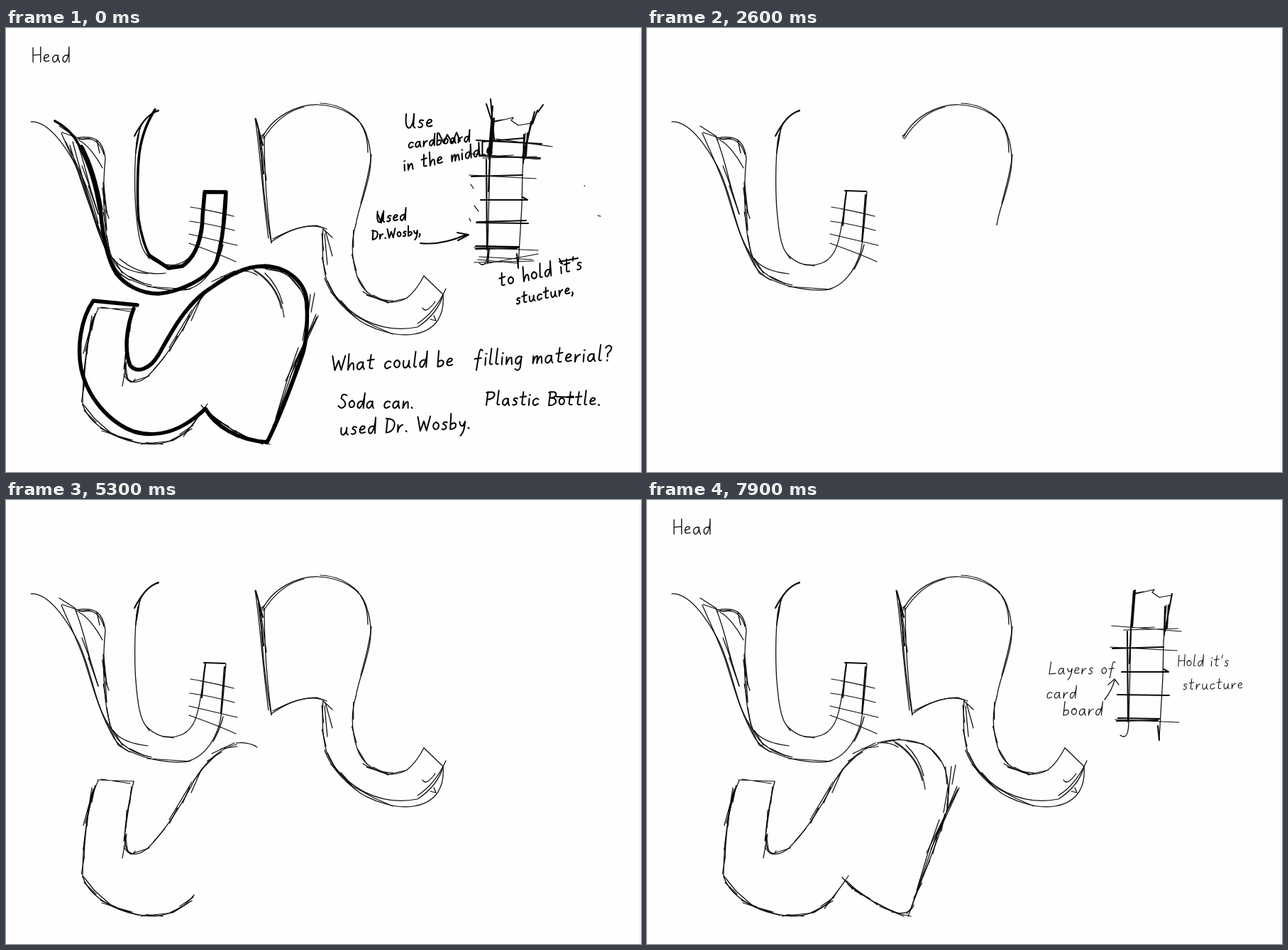
These frames come from a looping animation (895 by 625 pixels, 8 s). An HTML page:

```html
<!DOCTYPE html>
<html lang="en">
<head>
<meta charset="utf-8">
<title>Sketch replay</title>
<style>
  html, body { margin: 0; width: 100%; height: 100%; overflow: hidden; background: #fefefe; }
  svg { display: block; width: 100vw; height: 100vh; }
  path { fill: none; stroke: #0a0a0a; stroke-width: 1.25; stroke-linecap: round; stroke-linejoin: round; }
  .firm path { stroke: #000; stroke-width: 2; vector-effect: non-scaling-stroke; }
  .ink path { stroke: #000; stroke-width: 5.5; }
  path.mid { stroke-width: 2.1; }
  .ink path.mid { stroke-width: 3.6; }
  .ink path.fat { stroke-width: 7; }
</style>
</head>
<body>
<svg viewBox="0 0 895 625">
  <!-- handwriting: baseline at 0, x-height 10 -->
  <defs id="letters">
    <path data-c="a" d="M8-8Q4-11 1-6Q0 0 4 0Q8-2 8-9Q8-2 10 0"/>
    <path data-c="b" d="M1-20L1 0Q8 0 8-5Q7-10 1-6"/>
    <path data-c="c" d="M8-8Q4-11 1-6Q0 0 4 0L8-2"/>
    <path data-c="d" d="M8-8Q4-11 1-6Q0 0 4 0Q9-5 9-20L9 0"/>
    <path data-c="e" d="M1-5Q8-6 7-9Q3-12 1-6Q0 1 8-2"/>
    <path data-c="f" d="M9-18Q6-22 5-15L3 6M0-8L8-9"/>
    <path data-c="g" d="M8-8Q4-11 1-6Q0 0 4 0Q8-3 8-9L7 5Q5 10 1 6"/>
    <path data-c="h" d="M1-20L1 0Q4-10 7-8Q8-6 8 0"/>
    <path data-c="i" d="M1-9L1 0M1-14L2-14"/>
    <path data-c="l" d="M2-20L1-2Q2 0 4-1"/>
    <path data-c="m" d="M1-9L1 0Q3-10 6-9L6 0Q8-10 11-8L12 0"/>
    <path data-c="n" d="M1-9L1 0Q4-10 7-8L8 0"/>
    <path data-c="o" d="M5-10Q0-9 1-4Q3 1 7-2Q10-8 4-10"/>
    <path data-c="r" d="M1-9L1 0Q2-8 7-9"/>
    <path data-c="s" d="M7-9Q2-11 2-7Q7-5 6-2Q4 1 1-1"/>
    <path data-c="t" d="M4-18L3-2Q4 0 7-1M0-11L8-12"/>
    <path data-c="u" d="M1-9Q0 0 4 0Q8-2 8-9L8-2L10 0"/>
    <path data-c="y" d="M1-9Q2-2 6-4L8-9Q8 4 3 9"/>
    <path data-c="B" d="M2-18L1 0M0-17Q10-20 10-14Q9-10 2-10Q12-10 10-3Q6 1 1 0"/>
    <path data-c="D" d="M2-18L1 0M0-18Q13-17 11-8Q9 0 1 0"/>
    <path data-c="H" d="M1-19L1 0M11-20L11 0M1-9L11-10"/>
    <path data-c="L" d="M2-19L1 0L11-1"/>
    <path data-c="P" d="M2-18L1 0M0-17Q12-20 11-13Q9-8 2-8"/>
    <path data-c="S" d="M10-17Q3-21 3-13Q11-8 9-3Q5 3 0-3"/>
    <path data-c="U" d="M1-18Q0 0 6 0Q11-3 11-18L11-2L13 0"/>
    <path data-c="W" d="M0-18L4 0L8-12L12 0L16-18"/>
    <path data-c="." d="M1-1L2 0"/>
    <path data-c="," d="M1-2L2 0L0 4"/>
    <path data-c="'" d="M2-19L1-14"/>
    <path data-c="?" d="M1-16Q4-21 8-17Q9-13 4-9L4-5M4-1L4 0"/>
  </defs>

  <path d="M893.5 0V625" style="stroke:#f1f1f1"/>

  <g id="drawing">
    <!-- trunk, raised -->
    <g data-draw="1550 2450">
      <path d="M215 117C196 121 188 138 184 160C181 190 181 230 183 255C185 280 188 310 199 320C215 335 230 337 246 331C262 325 268 310 272 290Q277 265 281 230"/>
      <path class="mid" d="M215 116C200 121 190 135 181 152"/>
      <path d="M189 140L184 170M186 150L183 176M198 319L202 325M228 333L236 335"/>
      <path d="M98 155C125 150 137 158 140 184C137 215 136 245 145 268"/>
      <path d="M79 147L108 157Q130 152 138 178M99 157L118 155"/>
      <path d="M103 158C115 164 128 182 136 197M128 158L132 176"/>
      <path data-rough d="M137 217C138 270 140 300 150 325C160 345 180 357 205 362"/>
      <path d="M138 222L142 260M140 255L142 285"/>
      <path d="M175 354C200 366 230 370 250 369C275 366 293 343 301 315C306 295 307 260 310 231"/>
      <path d="M199 364L230 366L259 368M292 340Q302 322 306 305"/>
      <path class="mid" d="M279 229L309 230"/>
      <path class="mid" d="M276 278L279 245L281 231M303 300L308 235"/>
      <path d="M260 252Q290 257 321 265"/>
      <path d="M259 272Q290 276 322 285"/>
      <path d="M258 290L326 306"/>
      <path d="M258 303Q300 318 324 329"/>
      <path d="M75 138L97 152C108 180 112 200 119 226L130 262"/>
      <path d="M78 148C92 180 104 205 112 230C122 262 132 300 152 335Q160 347 173 354"/>
      <path d="M107 194L119 226M116 222L130 262M142 312L158 345L175 355"/>
      <path d="M35 132C60 131 84 166 102 200C117 232 122 265 133 293C148 332 165 342 200 346"/>
    </g>

    <!-- head in profile -->
    <g data-draw="2430 2600">
      <path d="M361 155C375 125 410 107 440 108C475 110 500 125 508 150C520 185 512 210 503 240Q496 260 493 277"/>
      <path d="M363 156Q385 120 420 111M360 152L364 149"/>
      <path d="M443 106Q475 107 497 130"/>
      <path d="M500 135Q510 150 510 175"/>
      <path d="M515 178C513 200 507 220 500 247"/>
    </g>
    <g data-draw="2600 3300">
      <path data-rough d="M493 277C486 300 487 325 495 350C502 372 525 386 545 386Q556 385 565 380"/>
      <path d="M503 371Q520 383 545 384M508 376L540 386L562 381"/>
      <path d="M351 127C358 170 360 220 370 296"/>
      <path class="mid" d="M352 128L362 165M356 145L363 205"/>
      <path d="M364 152C364 200 367 250 374 301M358 150L367 214"/>
      <path d="M360 185Q364 250 374 303"/>
      <path d="M374 301C400 283 425 275 446 281"/>
      <path d="M376 297Q410 278 438 278L452 283"/>
      <path data-rough d="M447 281C445 310 446 335 452 355Q465 387 500 408"/>
      <path d="M450 285L460 321M449 290L453 333M447 283L460 295"/>
    </g>
    <g data-draw="3300 3950">
      <path d="M565 380Q578 370 589 349"/>
      <path d="M589 349L615 374"/>
      <path d="M500 408C535 428 565 424 580 421Q609 402 616 375"/>
      <path d="M449 352C457 375 475 395 500 413C520 425 550 435 575 431C610 425 618 400 616 375"/>
      <path d="M620 367Q605 400 580 416M587 394Q592 403 605 385M598 410L606 412L603 405"/>
      <path d="M458 372L487 402L520 420L545 431"/>
    </g>

    <!-- head, lower left -->
    <g data-draw="3950 4100">
      <path d="M125 405C118 430 112 450 110 504"/>
      <path d="M123 407L109 458M121 405L114 450M124 407L112 455"/>
    </g>
    <g data-draw="4100 5300">
      <path data-rough d="M130 395C118 420 108 470 108 530"/>
      <path d="M129 394L180 396M134 393L175 399"/>
      <path data-rough d="M108 530C118 560 160 585 210 586C235 583 250 575 265 556"/>
      <path d="M109 530L125 550L150 572L178 580M135 567L175 580"/>
      <path d="M190 586L235 581L262 564M245 572L264 559"/>
      <path data-rough d="M180 396C172 430 165 465 168 485C172 502 185 502 200 490C225 465 250 425 265 395C280 370 300 350 325 344"/>
      <path d="M177 405L166 480M170 470L164 504M182 494Q176 505 166 488"/>
      <path d="M230 450L262 397M261 412L275 380L295 360"/>
      <path d="M290 357L322 342M303 350L326 347M325 342Q342 340 354 348"/>
    </g>
    <g data-draw="5300 6050">
      <path data-rough d="M325 342C350 335 385 335 405 355C425 375 426 400 424 430C418 460 400 500 368 586"/>
      <path d="M345 338C370 350 388 375 392 407"/>
      <path d="M350 342Q380 360 388 395M365 345Q383 362 390 388"/>
      <path d="M429 375L423 430M435 373L430 400M424 405L418 440"/>
      <path d="M440 405L400 492M437 403L405 480M438 407L394 497"/>
      <path d="M412 450L398 490L380 550M410 465L372 575L366 582"/>
      <path d="M265 556L284 529M250 575L280 535M275 531L290 548"/>
      <path data-rough d="M281 536L302 556M283 541Q320 570 358 583L372 586"/>
      <path d="M290 545L325 570M328 572L362 586M345 580Q370 586 376 570"/>
    </g>

    <g data-draw="6050 6250"><g data-say="Head" transform="translate(37 48) scale(1.07)"/></g>

    <!-- ladder -->
    <g data-draw="6250 6600">
      <path d="M684 151L682 190L681 230L679 310Q679 340 667 331"/>
      <path class="mid" d="M677 185L678 312M682 182L680 230"/>
      <path d="M732 148L728 200L727 250L722 335"/>
      <path class="mid" d="M730 150L729 190M720 318L722 338"/>
      <path class="mid" d="M669 242L735 242M728 238L735 242"/>
      <path class="mid" d="M663 274L736 275"/>
      <path d="M660 309L750 313"/>
      <path class="mid" d="M664 307L723 308M662 311L720 310"/>
    </g>
    <g class="draft" data-draw="6600 6800">
      <g data-say="Layers of" transform="translate(566 245) skewX(-6) scale(.9)"/>
      <g data-say="ca" transform="translate(563 279) skewX(-6) scale(.9)"/>
    </g>
    <g class="draft" data-draw="6850 7350">
      <g data-say="rd" transform="translate(586 279) skewX(-6) scale(.9)"/>
      <g data-say="board" transform="translate(586 303) skewX(-6) scale(.97)"/>
      <path d="M645 281Q655 268 659 254M650 260L659 252L665 260"/>
    </g>
    <g class="draft" data-draw="7350 7700">
      <g data-say="Hold it's" transform="translate(748 234) skewX(-4) scale(.83)"/>
    </g>
    <g data-draw="7700 7900">
      <path class="mid" d="M686 128L682 180M688 127L684 178"/>
      <path class="mid" d="M740 132L730 185M735 148L733 180"/>
      <path d="M685 133L715 126L712 130L722 137L740 134M688 131L700 129"/>
      <path d="M655 177L753 185M672 183L748 181M695 180L715 179"/>
      <path d="M653 207L747 212"/>
      <path class="mid" d="M656 209L728 207"/>
    </g>
    <g class="draft" data-draw="7700 7900">
      <g data-say="structure" transform="translate(755 267) rotate(-1) skewX(-4) scale(.83)"/>
    </g>

    <!-- finished sheet only -->
    <g class="final ink">
      <path class="mid" d="M210 115C197 135 189 160 187 185C185 210 185 250 187 270C190 290 197 312 203 321"/>
      <path d="M203 321L229 338L249 335C270 320 277 290 277 265L280 231L310 231C309 260 305 300 297 328C285 355 240 372 215 374C190 374 168 362 155 345"/>
      <path class="mid" d="M69 131Q95 145 105 170"/>
      <path class="fat" d="M106 168Q124 202 133 255"/>
      <path d="M133 255C137 305 148 340 160 350"/>
      <path d="M185 390L123 384C105 410 100 450 106 480C115 520 145 555 180 568C210 577 245 570 281 536C295 560 325 580 368 583C385 550 400 510 416 465C424 445 425 410 424 385C422 360 400 337 365 335C330 335 305 355 280 372C250 395 232 430 215 460C203 480 185 487 175 475C165 450 172 415 180 395"/>
    </g>
    <g class="final">
      <path d="M90 165Q115 250 142 310M84 160Q118 225 130 275M94 160Q112 230 136 295M160 325Q190 350 225 345"/>
      <path class="mid" d="M677 107L686 135L681 185M683 100L688 158M686 110L680 180"/>
      <path class="mid" d="M663 158L755 163M668 180L753 183M664 273L733 271M662 307L722 309M681 310L679 330"/>
      <path class="mid" d="M745 118L728 182M749 116L742 135M757 108L750 118M672 160L730 155"/>
      <path d="M690 156L770 167M667 322L742 326M660 330L744 328M670 333L750 318M665 326L720 331"/>
      <path d="M655 220L659 226M660 250L666 258M653 268L655 272M834 264L838 265M815 222h1"/>
      <path class="mid" d="M584 303Q615 306 648 291M636 288L652 291L637 299"/>
    </g>
    <g class="final firm">
      <g data-say="Use" transform="translate(562 141) rotate(-2) skewX(-5) scale(1.1)"/>
      <g data-say="cardboard" transform="translate(567 169) rotate(-6) skewX(-8) scale(.83)"/>
      <g data-say="in the middle" transform="translate(561 201) rotate(-11) skewX(-8) scale(.95)"/>
      <g data-say="Used" transform="translate(522 274) rotate(-5) skewX(-8) scale(.86)"/>
      <g data-say="Dr.Wosby," transform="translate(516 298) rotate(-6) skewX(-6) scale(.7)"/>
      <g data-say="to hold it's" transform="translate(696 364) rotate(-12) skewX(-8) scale(1.02)"/>
      <g data-say="stucture," transform="translate(719 389) rotate(-11) skewX(-8) scale(.85)"/>
      <g data-say="What could be" transform="translate(459 482) rotate(-2) skewX(-6) scale(1.12)"/>
      <g data-say="filling material?" transform="translate(660 475) rotate(-2) skewX(-6) scale(1.14)"/>
      <g data-say="Soda can." transform="translate(468 535) skewX(-6) scale(1.05)"/>
      <g data-say="Plastic Bottle." transform="translate(676 531) skewX(-4) scale(1.04)"/>
      <g data-say="used Dr. Wosby." transform="translate(471 573) rotate(-3) skewX(-6) scale(1.1)"/>
      <path d="M524 262L528 272L531 261L529 274M610 148L617 162L622 150L629 162L635 147L640 159M776 519L800 520M780 325L784 332M780 329L806 324"/>
    </g>
  </g>
</svg>
<script>
  const LOOP = 8000, STEP = 100, FADE_START = 800, FADE_END = 1200, REPLAY = 1500;
  const all = (selector, root = document) => [...root.querySelectorAll(selector)];
  const clamp = v => Math.max(0, Math.min(1, v));
  const drawing = document.getElementById('drawing');
  const glyphs = Object.fromEntries(all('#letters path').map(p => [p.dataset.c, p]));

  function write(group) {
    let x = 0;
    group.setAttribute('aria-label', group.dataset.say);
    for (const char of group.dataset.say) {
      if (char === ' ') { x += 10; continue; }
      const letter = group.appendChild(glyphs[char].cloneNode());
      const box = letter.getBBox();
      letter.setAttribute('transform', `translate(${x} 0)`);
      x += box.x + box.width + 3.5;
    }
  }

  // Go over a line again with short, slightly crossing strokes.
  function retrace(path) {
    const reach = 24, gap = 34, length = path.getTotalLength();
    let d = '';
    for (let s = 8; s + reach < length; s += gap) {
      const a = path.getPointAtLength(s), b = path.getPointAtLength(s + reach);
      const off = 1.6 * Math.sin(s * 1.7) / reach;
      const nx = (a.y - b.y) * off, ny = (b.x - a.x) * off;
      d += `M${a.x + nx} ${a.y + ny}L${b.x - nx} ${b.y - ny}`;
    }
    const copy = path.cloneNode();
    copy.setAttribute('d', d);
    path.after(copy);
  }

  // Share a group's time span among its strokes by length.
  function schedule(group) {
    const [from, to] = group.dataset.draw.split(' ').map(Number);
    const paths = all('path', group);
    const lengths = paths.map(p => p.getTotalLength());
    const total = lengths.reduce((a, b) => a + b, 0);
    let done = 0;
    return paths.map((path, i) => {
      const span = (to - from) * lengths[i] / total;
      const start = from + (to - from) * done / total;
      done += lengths[i];
      path.setAttribute('pathLength', 1);
      return { path, start, span };
    });
  }

  all('[data-say]').forEach(write);
  all('[data-rough]').forEach(retrace);
  const strokes = all('[data-draw]').flatMap(schedule);
  const drafts = all('.draft'), finals = all('.final');
  const show = (el, on) => { el.style.display = on ? '' : 'none'; };

  function render(t) {
    const finished = t < REPLAY;
    drawing.style.opacity = finished ? clamp((FADE_END - t) / (FADE_END - FADE_START)) : 1;
    finals.forEach(el => show(el, finished));
    drafts.forEach(el => show(el, !finished));
    for (const { path, start, span } of strokes) {
      const p = finished ? 1 : clamp((t - start + 0.01) / span);
      show(path, p > 0);
      path.style.strokeDasharray = p < 1 ? '1 1' : 'none';
      path.style.strokeDashoffset = 1 - p;
    }
  }

  let origin;
  function tick(now) {
    origin ??= now;
    render(Math.floor((now - origin) % LOOP / STEP) * STEP);
    requestAnimationFrame(tick);
  }
  render(0);
  requestAnimationFrame(tick);
</script>
</body>
</html>
```
